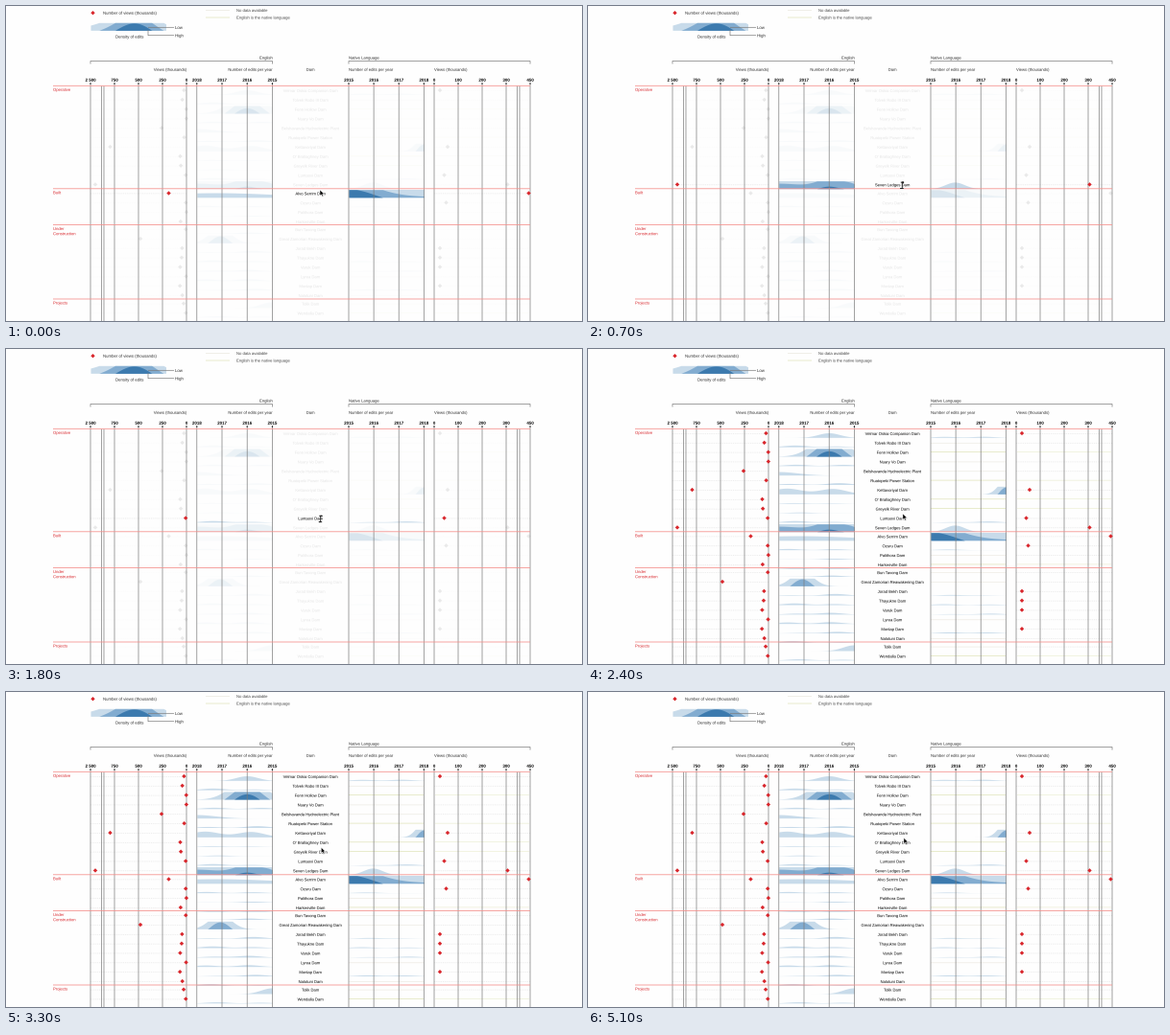
Write a matplotlib script that moves like this. It is 600x329 px and loops after 5300 ms.

```python
import numpy as np
import matplotlib.pyplot as plt
from matplotlib.animation import FuncAnimation
from matplotlib.colors import to_rgb
from matplotlib.patches import PathPatch, Polygon
from matplotlib.path import Path
from matplotlib.textpath import TextPath

W, H, DPI = 600, 329, 100
PX = 72 / DPI
STEP, FRAMES = 100, 53

RED, PALE_RED, GREY = "#d9262c", "#f58f8b", "#7a7a7a"
BLUES = ["#c8dbea", "#82acd0", "#3c7aae"]
NATIVE, NO_DATA = "#e0e3b8", "#ebe8df"
DIM = .1
ROW_GAP, BAND = 9.84, 8
rng = np.random.default_rng(4)

SECTIONS = [
    ("Operative", 83.3, [
        "Velmar Oskia Companion Dam", "Tolvek Rabo III Dam", "Fenn Hollow Dam",
        "Nuary Vo Dam", "Belshavanda Hydroelectric Plant",
        "Ruatopeki Power Station", "Kettavoriyal Dam", "O' Brallaghney Dam",
        "Greyelk River Dam", "Luntaoxi Dam", "Seven Ledges Dam"]),
    ("Built", 190.8, [
        "Alvo Serrim Dam", "Ozuru Dam", "Palithora Dam", "Harkenville Dam"]),
    ("Under Construction", 228.5, [
        "Bun Tavong Dam", "Great Zamorian Reawakening Dam", "Jorad Bekh Dam",
        "Thayukne Dam", "Varuk Dam", "Lyrea Dam", "Monlap Dam",
        "Nalotuni Dam"]),
    ("Projects", 306, ["Tolik Dam", "Wendalla Dam"]),
]

# Dams in English-speaking countries have no separate native page
NATIVE_ROWS = {2, 5, 7, 8, 14, 24}

# Only dams with many views; the rest sit close to zero
TOP_VIEWS = {4: 162, 6: 108.5, 10: 93, 11: 169.5, 16: 140}
TOP_NATIVE_VIEWS = {6: 460, 9: 456.5, 10: 522.5, 11: 544.5, 12: 458.5}
LOW_NATIVE_VIEWS = {0, 17, 18, 19, 21}

# Main edit peaks: (centre, width, height in bands); the rest are ripples
PEAKS = {
    0: [(52, 16, .6)],
    2: [(52, 24, 2.7)],
    4: [(0, 28, .45)],
    6: [(8, 22, .75), (56, 20, .7)],
    10: [(0, 60, 1.7), (54, 20, 1.5), (78, 14, 1)],
    11: [(20, 90, .6)],
    16: [(24, 16, 1.9)],
    23: [(78, 16, .75)],
}
NATIVE_PEAKS = {
    6: [(78, 11, 1.9)],
    10: [(25, 14, .85)],
    11: [(0, 38, 1.9), (30, 200, 1.2)],
}

# (enter ms, leave ms, fade ms, row)
HOVERS = [(-300, 100, 100, 11), (500, 1300, 300, 10), (1700, 2300, 200, 9),
          (2500, 3000, 250, 8), (3400, 3900, 300, 7), (4200, 5000, 200, 7)]

fig = plt.figure(figsize=(W / DPI, H / DPI), dpi=DPI, facecolor="#fefefe")
ax = fig.add_axes([0, 0, 1, 1])
ax.set_xlim(0, W)
ax.set_ylim(H, 0)
ax.axis("off")


def line(xs, ys, color=GREY, lw=.7, z=3, **kw):
    return ax.plot(xs, ys, color=color, lw=lw * PX, zorder=z, snap=False,
                   solid_capstyle="butt", **kw)[0]


def label(x, y, text, align=0, size=4.2, color="#2a2a2a", weight="normal"):
    """Text centred on y; align is 0 left, .5 centre, 1 right."""
    glyphs = TextPath((0, 0), text, size=size,
                      prop={"family": "Liberation Sans", "weight": weight})
    verts = glyphs.vertices * [1, -1]
    verts = verts + [x - align * glyphs.get_extents().x1, y + .36 * size]
    return ax.add_patch(PathPatch(Path(verts, glyphs.codes), fc=color, lw=0,
                                  zorder=4, snap=False))


def diamond(x, y, r=2.2):
    pts = [(x, y - r), (x + r, y), (x, y + r), (x - r, y)]
    return ax.add_patch(Polygon(pts, fc=RED, lw=0, zorder=5, snap=False))


def horizon(x0, base, bumps, width=78.5):
    """Folded density bands, one fill per overflow level."""
    x = np.linspace(0, width, 90)
    v = sum(a * np.exp(-((x - c) / w) ** 2) for c, w, a in bumps)
    return [ax.fill_between(x0 + x, base, base - BAND * np.clip(v - k, 0, 1),
                            color=color, lw=0, zorder=2)
            for k, color in enumerate(BLUES) if v.max() > k]


def ripple(height):
    """Two low random bumps, one in each half of the years."""
    return [(c + rng.uniform(-8, 8), 17, height * rng.random())
            for c in (16, 60)]


def draw_legend():
    diamond(90.5, 7.2)
    label(101, 7.2, "Number of views (thousands)", size=4.3)
    horizon(88, 25.3, [(46, 29, 2.9), (5, 26, .45)])
    line([148, 175], [22.3, 22.3])
    line([148, 148, 175], [25, 30.7, 30.7])
    label(176, 22.4, "Low", size=4.3)
    label(176, 30.8, "High", size=4.3)
    label(114, 32, "Density of edits", size=4.3)
    for y, color, text in [(4.5, NO_DATA, "No data available"),
                           (12, NATIVE, "English is the native language")]:
        line([208, 233], [y, y], color)
        label(240, y, text, color="#444444")


def draw_axes():
    for a, b in [(88, 277.5), (357, 546)]:
        line([a, a, b, b], [60.5, 57.5, 57.5, 60.5])
    label(277.5, 54, "English", 1)
    label(357, 54, "Native Language")
    label(317, 66.3, "Dam", .5)
    for x, align, text in [(188, 1, "Views (thousands)"),
                           (277.5, 1, "Number of edits per year"),
                           (357, 0, "Number of edits per year"),
                           (446, 0, "Views (thousands)")]:
        label(x, 66.3, text, align)

    years = [str(year) for year in range(2015, 2019)]
    axes = [(88, 25, ["2 500", "750", "500", "250", "0"]),
            (198.8, 26.2, years[::-1]), (357, 26.1, years),
            (446, 25, ["0", "100", "200", "300", "450"])]
    for x0, gap, ticks in axes:
        for i, text in enumerate(ticks):
            x = x0 + i * gap
            label(x, 77.2, text, .5, 4.4, "black", "bold")
            line([x, x], [80, 82], "#333333", 1.1)
            line([x, x], [82, H])
    for x in (99.5, 102, 532.5, 535):
        line([x, x], [83.5, H])


def draw_row(i, y, name):
    """Returns (fading artists, markers) of one dam."""
    parts = [label(317, y, name, .5, 4.15, "black")]
    dots = dict(color="#e0e0e0", lw=.6, z=1, linestyle=(0, (1.5, 1.5)))
    parts.append(line([88, 188], [y, y], **dots))
    parts += horizon(198.8, y + 3.9, PEAKS.get(i, ripple(.25)))

    views = TOP_VIEWS.get(i, 188 - 7 * rng.random() ** 2)
    marks = [diamond(views, y - .4)]
    if i in NATIVE_ROWS:
        parts.append(line([357, 435], [y - .5] * 2, NATIVE, z=1))
        parts.append(line([447, 545], [y - .5] * 2, NATIVE, .4, 1))
        return parts, marks

    parts.append(line([446, 546], [y, y], **dots))
    if i in TOP_NATIVE_VIEWS or i in LOW_NATIVE_VIEWS:
        marks.append(diamond(TOP_NATIVE_VIEWS.get(i, 452), y - .4))
        bumps = NATIVE_PEAKS.get(i, ripple(.16))
        parts += horizon(357, y + 3.9, bumps)
    else:
        parts.append(line([357, 435], [y, y], NO_DATA, .6, 1))
    return parts, marks


draw_legend()
draw_axes()
rows, row_y = [], []
for title, top, names in SECTIONS:
    line([49, 546], [top, top], PALE_RED, .8)
    for k, word in enumerate(title.split()):
        label(49, top + 4 + 5.2 * k, word, color=RED)
    for k, name in enumerate(names):
        row_y.append(top + 5.1 + k * ROW_GAP)
        rows.append(draw_row(len(rows), row_y[-1], name))

ARROW = np.array([(0, 0), (0, 6.4), (1.5, 5), (2.6, 7.3), (3.6, 6.8),
                  (2.6, 4.6), (4.6, 4.5)])
arrow = ax.add_patch(Polygon(ARROW, fc="black", ec="white", lw=.5 * PX,
                             zorder=6))
BEAM_X = np.array([-1.5, 1.5, 0, 0, -1.5, 1.5])
BEAM_Y = np.array([-3.2, -3.2, -3.2, 3.2, 3.2, 3.2])
beam = line(BEAM_X, BEAM_Y, "#222222", .9, 6)


def set_rows(level, hovered):
    red, grey = np.array(to_rgb(RED)), np.array(to_rgb("#8a8a8a"))
    for i, (parts, marks) in enumerate(rows):
        v = 1 if i == hovered else level
        for part in parts:
            part.set_alpha(DIM + (1 - DIM) * v)
        for mark in marks:
            mark.set_facecolor(grey + (red - grey) * v)
            mark.set_alpha(.17 + .83 * v)


def update(n):
    t = n * STEP
    enter, leave, fade, row = [h for h in HOVERS if h[0] <= t][-1]
    left = t >= leave
    p = min(1, (t - (leave if left else enter) + STEP) / fade)
    p = p * p * (3 - 2 * p)
    set_rows(p if left else 1 - p, row)

    # The pointer turns into a text beam when it rests on a name
    on_text = not left and 8 <= row <= 10
    x, y = 327 + 2 * t / (FRAMES * STEP), row_y[row]
    arrow.set_xy(ARROW + [x, y - 4 - left])
    beam.set_data(BEAM_X + x, BEAM_Y + y + .5)
    arrow.set_visible(not on_text)
    beam.set_visible(on_text)
    return []


anim = FuncAnimation(fig, update, frames=FRAMES, interval=STEP, repeat=True,
                     repeat_delay=0, blit=False)
plt.show()
```
